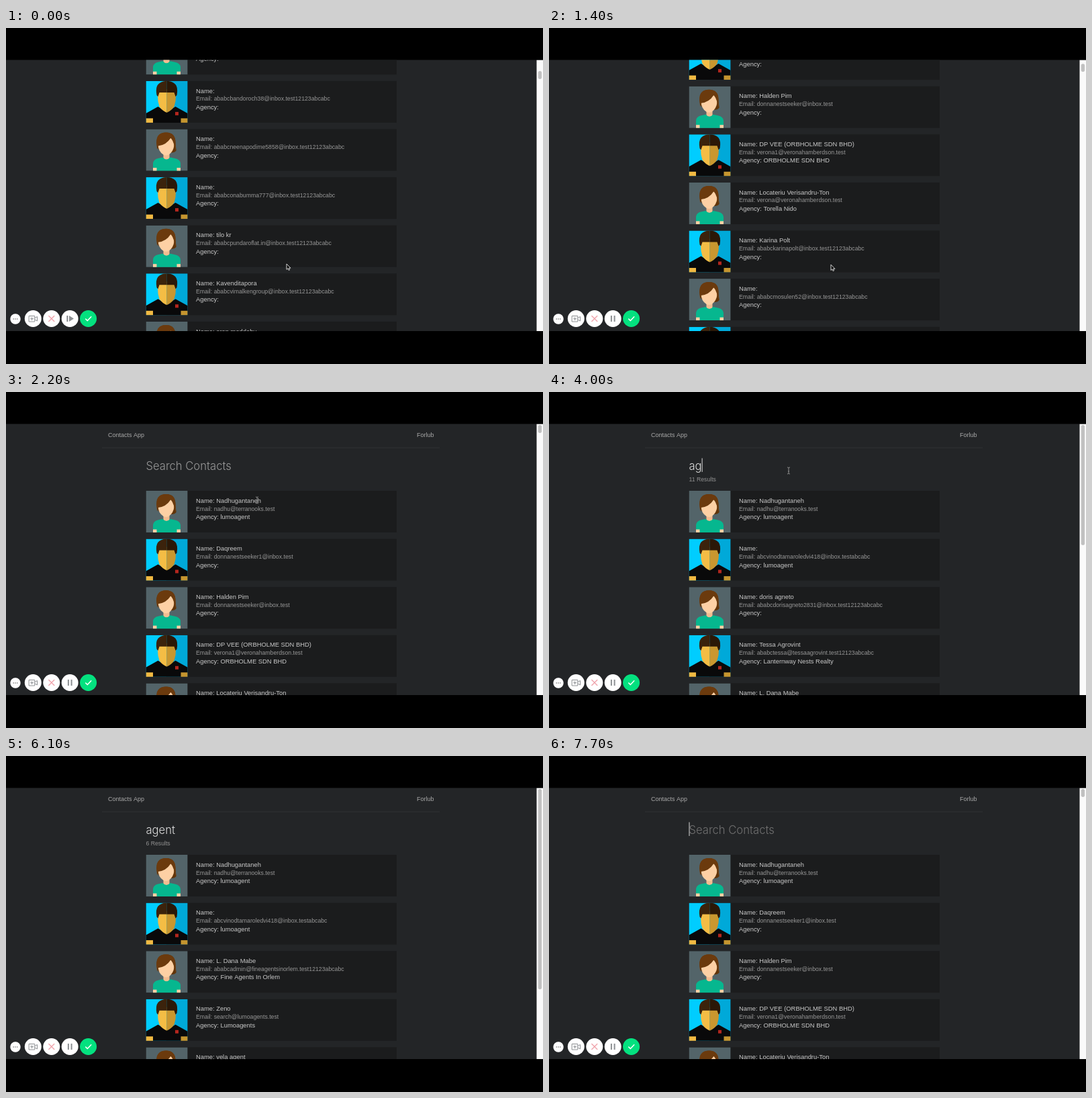
Write an HTML page with a canvas that moves like this. It is 800 px wide and 500 px high and loops after 8000 ms.

```html
<!DOCTYPE html>
<html lang="en">
<head>
<meta charset="utf-8">
<title>Contact search</title>
<style>
  html, body { margin: 0; width: 100%; height: 100%; overflow: hidden; background: #000; }
  canvas { display: block; width: 800px; height: 500px; }
</style>
</head>
<body>
<canvas id="stage" width="800" height="500"></canvas>
<script>
const ctx = document.getElementById('stage').getContext('2d');
const LOOP = 8000;
const STEP = 100;
const PITCH = 71.6;
const FIRST_CARD = 147;
const VIEW = { top: 47.5, bottom: 451 };
const FONT = '"Liberation Sans", Arial, sans-serif';
const TITLE_FONT = '300 16.6px Inter, "Liberation Sans", sans-serif';

// name | email | agency
const parse = lines => lines.trim().split('\n').map(line => line.trim().split('|'));

const everyone = parse(`
  Nadhugantaneh|nadhu@terranooks.test|lumoagent
  Daqreem|donnanestseeker1@inbox.test|
  Halden Pim|donnanestseeker@inbox.test|
  DP VEE (ORBHOLME SDN BHD)|verona1@veronahamberdson.test|ORBHOLME SDN BHD
  Locateriu Verisandru-Ton|verona@veronahamberdson.test|Torella Nido
  Karina Polt|ababckarinapolt@inbox.test12123abcabc|
  |ababcmosulen52@inbox.test12123abcabc|
  Tovan Brell|ababctovanbrell@inbox.test12123abcabc|
  |ababcpelluno61@inbox.test12123abcabc|
  |ababcbandoroch38@inbox.test12123abcabc|
  |ababcneenapodime5858@inbox.test12123abcabc|
  |ababconabumma777@inbox.test12123abcabc|
  tilo kr|ababcpundaroflat.in@inbox.test12123abcabc|
  Kavenditapora|ababcvimalkengroup@inbox.test12123abcabc|
  oren maddaby|ababcocmaddaby.nests@inbox.test12123abcabc|
  |ababcsendoli17@inbox.test12123abcabc|`);

const matches = parse(`
  |abcvinodtamaroledvi418@inbox.testabcabc|lumoagent
  doris agneto|ababcdorisagneto2831@inbox.test12123abcabc|
  Tessa Agrovint|ababctessa@tessaagrovint.test12123abcabc|Lanternway Nests Realty
  L. Dana Mabe|ababcadmin@fineagentsinorlem.test12123abcabc|Fine Agents In Orlem
  Zeno|search@lumoagents.test|Lumoagents
  vela agent|ababcvela@inbox.test12123abcabc|`);

const pick = (list, ...ids) => ids.map(i => list[i]);
const agentRows = [everyone[0], ...pick(matches, 0, 3, 4, 5)];
const results = {
  '': { rows: everyone, count: 0 },
  a: { rows: pick(everyone, 0, 1, 2, 4, 5), count: 268 },
  ag: { rows: [everyone[0], ...pick(matches, 0, 1, 2, 3)], count: 11 },
  age: { rows: agentRows, count: 7 },
  agen: { rows: agentRows, count: 6 },
  agent: { rows: agentRows, count: 6 }
};

// time, query
const FOCUS = 2900;
const typing = [
  [0, ''], [FOCUS, ''], [3200, 'a'], [3900, 'ag'], [4600, 'age'], [5100, 'agen'], [5600, 'agent'],
  [6700, 'agen'], [6900, 'age'], [7100, 'ag'], [7300, 'a'], [7600, '']
];

// time, x, y
const pointer = [
  [0, 418, 351], [1100, 419, 352.5], [1600, 420.5, 352], [1850, 420.5, 352],
  [2200, 374, 161], [2700, 357, 117]
];
const IBEAM_FROM = 2080, POINTER_HIDDEN = 4400;

const smooth = u => u * u * (3 - 2 * u);
const clamp = u => Math.max(0, Math.min(1, u));

function along(keys, t) {
  let i = 0;
  while (i < keys.length - 2 && t >= keys[i + 1][0]) i++;
  const [a, b] = [keys[i], keys[i + 1]];
  const u = smooth(clamp((t - a[0]) / (b[0] - a[0])));
  return [a[1] + (b[1] - a[1]) * u, a[2] + (b[2] - a[2]) * u];
}

function scrollAt(t) {
  if (t < 1100) return 712.5 + 14.4 * smooth(clamp((t - 50) / 850));
  return 726.9 * Math.pow(1 - clamp((t - 1100) / 800), 2.709);
}

function box(x, y, w, h, color) {
  ctx.fillStyle = color;
  ctx.fillRect(x, y, w, h);
}

function shape(d, color) {
  ctx.fillStyle = color;
  ctx.fill(new Path2D(d));
}

function stroke(d, color, width) {
  ctx.strokeStyle = color;
  ctx.lineWidth = width;
  ctx.stroke(new Path2D(d));
}

function disc(x, y, r, color) {
  ctx.fillStyle = color;
  ctx.beginPath();
  ctx.arc(x, y, r, 0, 7);
  ctx.fill();
}

function pill(x, y, w, h, r, color) {
  ctx.fillStyle = color;
  ctx.beginPath();
  ctx.roundRect(x, y, w, h, r);
  ctx.fill();
}

function write(str, x, y, font, color) {
  ctx.font = font;
  ctx.fillStyle = color;
  ctx.fillText(str, x, y);
}

const text = (str, x, y, size, color) => write(str, x, y, `${size}px ${FONT}`, color);

function drawWoman() {
  box(0, 0, 62, 62, '#536469');
  shape('M16 20Q16 5 30 5Q44 5 44 20L45 32Q43 35 38 35L21 32Q16 28 16 20Z', '#613409');
  shape('M26 34H35V46H26Z', '#f2bd91');
  shape('M18 22Q18 12 30 12Q42 12 42 24Q41 33 34 38Q30 40 26 38Q18 33 18 22Z', '#fdd0a4');
  shape('M10.5 62V51Q11 45 18 43.5L25 42Q30.5 48 36 42L43 43.5Q51 45 51.5 51V62Z', '#06b78f');
  box(10.5, 57.5, 5.5, 4.5, '#fdd0a4');
  box(46, 57.5, 5.5, 4.5, '#fdd0a4');
  shape('M16 25Q13 5 30 5Q45 5 44 23L45 32Q42 29 41.5 22Q40 17 37 13Q30 24 18 25Q17 27 18 31Q16 29 16 25Z', '#6b3a0d');
}

function drawMan() {
  box(0, 0, 31, 62, '#00cdff');
  box(31, 0, 31, 62, '#00a9d9');
  shape('M0 62V48L18 38L31 46L44 38L62 48V62Z', '#09090a');
  shape('M17 14L18 30L20 38Q24 44 31 47V12Z', '#f4bd45');
  shape('M45 14L44 30L42 38Q38 44 31 47V12Z', '#c9972f');
  shape('M16 21Q14 10 18 5Q23 0 31 0V17H20L18 23Z', '#3b230c');
  shape('M46 21Q48 10 44 5Q39 0 31 0V17H42L44 23Z', '#2b1807');
  box(0, 55.5, 10.5, 6.5, '#f0b942');
  box(52, 55.5, 10, 6.5, '#c5952f');
  box(43.5, 46, 5, 5, '#b3261e');
}

function drawCard([name, email, agency], index, y) {
  box(209, y, 373, 62, '#1b1c1d');
  ctx.save();
  ctx.translate(208.5, y);
  ctx.beginPath();
  ctx.rect(0, 0, 62.3, 62.2);
  ctx.clip();
  index % 2 ? drawMan() : drawWoman();
  ctx.restore();
  text('Name: ' + name, 283, y + 17.6, 9.4, '#c9c9c9');
  text('Email: ' + email, 283, y + 29.5, 8.73, '#979797');
  text('Agency: ' + agency, 283, y + 42, 9.4, '#c9c9c9');
}

function drawPage(t, scroll, query, since) {
  const { rows, count } = results[query];
  ctx.save();
  ctx.translate(0, -scroll);
  text('Contacts App', 152, 67.3, 9, '#a9a9a9');
  text('Forlub', 612, 67.3, 9, '#a9a9a9');
  box(143, 82.5, 503, 1, '#303234');

  if (query) {
    write(query, 208.5, 115.5, TITLE_FONT, '#dedede');
    text(count + ' Results', 208.5, 132.8, 8.7, '#929292');
  } else {
    write('Search Contacts', 208.5, 115.5, TITLE_FONT, t < FOCUS ? '#989898' : '#707070');
  }
  if (t >= FOCUS && since % 1000 < 500) {
    ctx.font = TITLE_FONT;
    box(208.5 + ctx.measureText(query).width, 98.5, 1, 20.5, '#d8d8d8');
  }

  rows.forEach((row, i) => {
    const y = FIRST_CARD + i * PITCH;
    if (y - scroll > VIEW.top - 70 && y - scroll < VIEW.bottom) drawCard(row, i, y);
  });
  ctx.restore();

  const short = count > 0 && count < 20;
  const thumb = short ? 160000 / (107 + 71.6 * count) : 12;
  box(790.5, VIEW.top, 9.5, VIEW.bottom - VIEW.top, '#fafafa');
  pill(792.7, 49 + scroll * 0.021, 5.4, thumb, 2.7, '#c1c1c1');
}

function drawPointer(t) {
  if (t >= POINTER_HIDDEN) return;
  const [x, y] = along(pointer, t);
  ctx.save();
  ctx.translate(x, y);
  if (t < IBEAM_FROM) {
    const arrow = 'M0 0V8.4L1.9 6.7L3.2 9.5L4.6 8.9L3.4 6.2H6Z';
    shape(arrow, '#0b0b0b');
    stroke(arrow, '#e8e8e8', 0.9);
  } else {
    stroke('M-2-5Q0-5 0-3.5V3.5Q0 5-2 5M2-5Q0-5 0-3.5M0 3.5Q0 5 2 5M-1 1H1', '#8d8d8d', 1);
  }
  ctx.restore();
}

function drawControls(t) {
  disc(14, 433, 7.7, '#fff');
  for (const x of [11.2, 14, 16.8]) disc(x, 433, 0.8, '#666');
  for (const x of [40.3, 67.8, 95.2]) disc(x, 432.5, 12.5, '#fff');
  disc(122.6, 432.5, 12.5, '#04e17f');

  ctx.lineCap = ctx.lineJoin = 'round';
  stroke('M34.5 428.5H42.8V437H34.5ZM43 431.5L46.5 429.5V436L43 434M38.6 430.8V434.7M36.7 432.7H40.6', '#8d9093', 1);
  stroke('M63.8 428.5L71.8 436.5M71.8 428.5L63.8 436.5', '#f0a5ad', 1.4);
  if (t < 100) {
    box(90.5, 428, 1.8, 9, '#777b7e');
    shape('M94 428L101 432.5L94 437Z', '#8d9093');
  } else {
    box(91.9, 428, 2, 9, '#8d9093');
    box(96.6, 428, 2, 9, '#8d9093');
  }
  stroke('M118.7 433L121.4 435.6L126.8 429.8', '#fff', 1.5);
  ctx.lineCap = 'butt';
  ctx.lineJoin = 'miter';
}

function draw(t) {
  const [start, query] = typing.filter(step => step[0] <= t).pop();
  box(0, 0, 800, 500, '#000');
  ctx.save();
  ctx.beginPath();
  ctx.rect(0, VIEW.top, 800, VIEW.bottom - VIEW.top);
  ctx.clip();
  box(0, 0, 800, 500, '#232527');
  drawPage(t, scrollAt(t), query, t - start);
  drawPointer(t);
  drawControls(t);
  ctx.restore();
}

const began = performance.now();
function tick() {
  const t = (performance.now() - began) % LOOP;
  draw(Math.floor(t / STEP) * STEP);
  requestAnimationFrame(tick);
}
tick();
</script>
</body>
</html>
```
